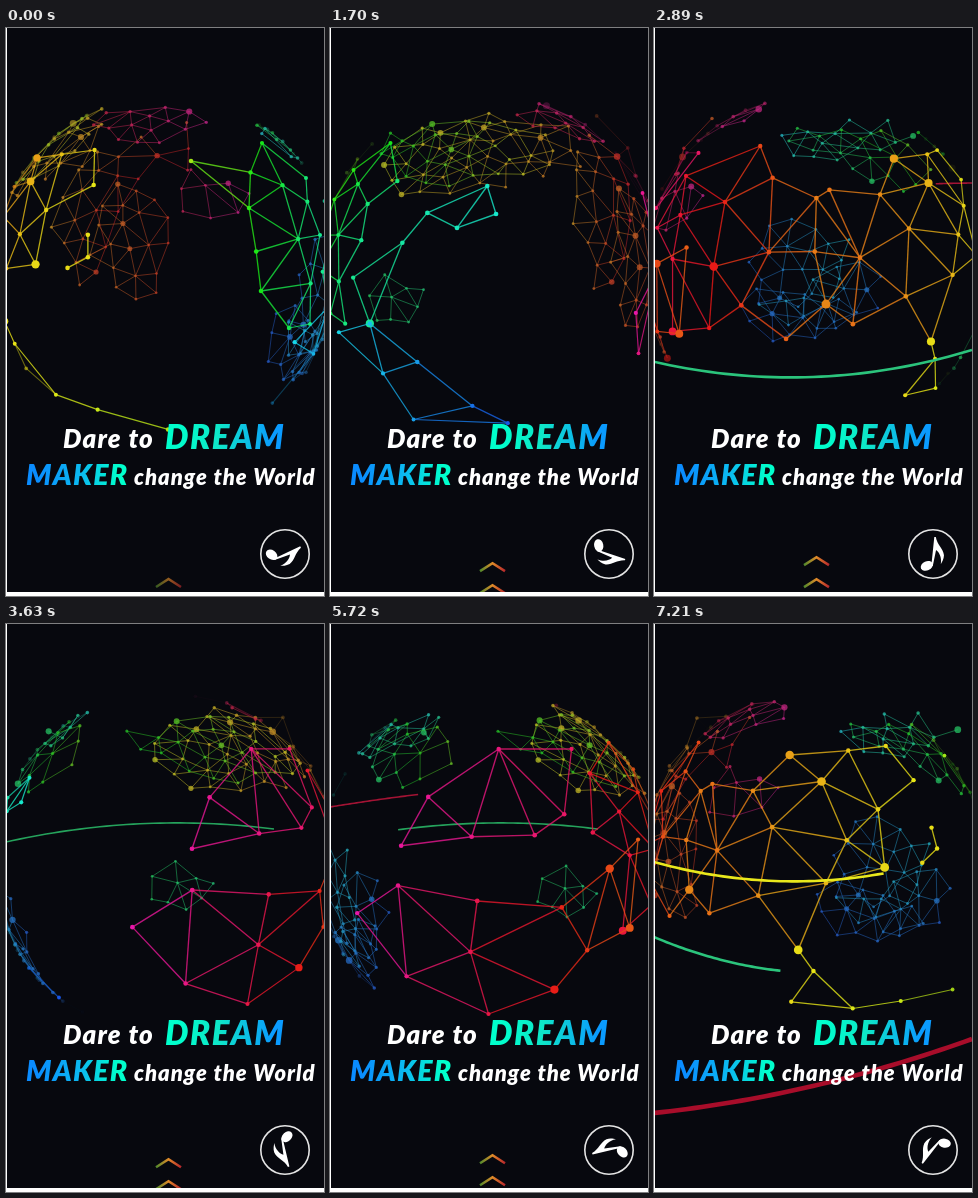
An HTML page with a canvas for the animation above (8 s loop, 318 px wide and 568 px high).

```html
<!DOCTYPE html>
<html lang="en">
<head>
<meta charset="utf-8">
<title>Dream globe</title>
<style>
  html, body { margin: 0; width: 100%; height: 100%; overflow: hidden; background: #fff; }
  canvas, svg { position: absolute; left: 0; top: 0; width: 318px; height: 568px; }
  text { font-family: Lato, "Open Sans", sans-serif; font-weight: 900; font-style: italic; letter-spacing: .045em; }
</style>
</head>
<body>
<canvas id="stage" width="318" height="568"></canvas>
<svg viewBox="0 0 318 568">
  <defs>
    <linearGradient id="dream"><stop offset=".1" stop-color="#0fc"/><stop offset=".45" stop-color="#0ee6c8"/><stop offset=".9" stop-color="#0a9bff"/></linearGradient>
    <linearGradient id="maker"><stop offset=".1" stop-color="#0a8cff"/><stop offset=".55" stop-color="#0bbcf0"/><stop offset=".9" stop-color="#0fc"/></linearGradient>
  </defs>
  <text x="57" y="420" font-size="26" fill="#fff">Dare to</text>
  <text x="159" y="421" font-size="33" fill="url(#dream)">DREAM</text>
  <text x="20" y="457" font-size="28.5" fill="url(#maker)">MAKER</text>
  <text x="128" y="457" font-size="22" fill="#fff">change the World</text>
  <g transform="translate(279 526)">
    <circle r="24.2" fill="#07080e" stroke="#e4e4e4" stroke-width="1.6"/>
    <g id="note" fill="#fff">
      <ellipse cx="-6" cy="12" rx="6.3" ry="4.6" transform="rotate(-25 -6 12)"/>
      <path d="M-1.500 12L1-17H2.500C4-9 10-6 11 1C11 5 9 8 8 10C9 3 6-2 3-4L0 12Z"/>
    </g>
  </g>
</svg>
<script>
const LOOP = 8000, TURN = 2280, STEP = 148.8;
const CX = 160, CY = 240, RADIUS = 165, CAMERA = 3.5, TILT = 0.2;
const NEAR = 1, FAR = -1;
const ctx = document.getElementById('stage').getContext('2d');
const note = document.getElementById('note');
const clamp = (v, lo = 0, hi = 1) => Math.min(hi, Math.max(lo, v));

let seed = 11;
const random = () => (seed = seed * 16807 % 2147483647) / 2147483647;

const spinAt = t => t / TURN * 2 * Math.PI;

function rotate(x, y, angle) {
  const c = Math.cos(angle), s = Math.sin(angle);
  return [x * c + y * s, y * c - x * s];
}

// Screen point to globe point, on the near or far side
function toGlobe(px, py, t, side) {
  const u = (px - CX) / RADIUS, v = (py - CY) / RADIUS, dd = CAMERA * CAMERA;
  const q = u * u + v * v + dd;
  const s = (dd - side * Math.sqrt(Math.max(0, dd * dd - q * (dd - 1)))) / q;
  const [y, z] = rotate(v * s, CAMERA - s * CAMERA, -TILT);
  const [x, depth] = rotate(u * s, z, -spinAt(t));
  return [x, y, depth];
}

function toScreen([gx, gy, gz], t) {
  const [x, depth] = rotate(gx, gz, spinAt(t));
  const [y, z] = rotate(gy, depth, TILT);
  const k = CAMERA / (CAMERA - z);
  return { x: CX + RADIUS * x * k, y: CY + RADIUS * y * k, z, k };
}

const gap2 = (a, b) => a.reduce((sum, v, i) => sum + (v - b[i]) ** 2, 0);

function insidePolygon(corners, x, y) {
  return corners.reduce((inside, [x1, y1], i) => {
    const [x2, y2] = corners[(i + 1) % corners.length];
    return (y1 > y) !== (y2 > y) && x < x1 + (x2 - x1) * (y - y1) / (y2 - y1) ? !inside : inside;
  }, false);
}

// Scatter nodes evenly over an area, keeping them `space` apart on the globe
function scatter(net, t, [x0, y0, x1, y1], hue, inside, corners = []) {
  const add = (x, y, always) => {
    const at = toGlobe(x, y, t, net.side);
    if (!always && net.nodes.some(n => gap2(n.at, at) < net.space ** 2)) return;
    net.nodes.push({ at, hue: hue[0] + (hue[1] - hue[0]) * (x - x0) / (x1 - x0), hub: random() < net.hubs });
  };
  corners.forEach(([x, y]) => add(x, y, true));
  for (let i = 0; i < 700; i++) {
    const x = x0 + random() * (x1 - x0), y = y0 + random() * (y1 - y0);
    if (inside(x, y)) add(x, y);
  }
}

// Join two nodes when no third node lies between them
function join(net, reach) {
  net.nodes.forEach((a, i) => net.nodes.forEach((b, j) => {
    const d = gap2(a.at, b.at);
    if (j > i && d < reach * reach &&
      net.nodes.every(c => c === a || c === b || gap2(a.at, c.at) + gap2(b.at, c.at) > d * 0.9)) net.edges.push([i, j]);
  }));
  return net;
}

// Land on the near side, outlined as seen at time t; parts share one mesh
function land(space, ...parts) {
  const net = { side: NEAR, space, hubs: 0.17, nodes: [], edges: [] };
  for (const [t, hue, outline] of parts) {
    const corners = outline.split(' ').map(p => p.split(',').map(Number));
    const xs = corners.map(c => c[0]), ys = corners.map(c => c[1]);
    const box = [Math.min(...xs), Math.min(...ys), Math.max(...xs), Math.max(...ys)];
    scatter(net, t, box, hue, (x, y) => insidePolygon(corners, x, y), corners);
  }
  return join(net, Math.max(0.42, space * 2.2));
}

// Oval cloud of nodes on the far side
function cloud(t, hue, cx, cy, rx, ry, space = 0.14) {
  const net = { side: FAR, space, hubs: 0.05, nodes: [], edges: [] };
  scatter(net, t, [cx - rx, cy - ry, cx + rx, cy + ry], hue,
    (x, y) => ((x - cx) / rx) ** 2 + ((y - cy) / ry) ** 2 < 1);
  return join(net, space * 2);
}

const clouds = [
  cloud(4830, [220, 185], 252, 245, 52, 50),
  cloud(4830, [185, 140], 262, 110, 55, 24),
  cloud(3630, [140, 152], 170, 263, 38, 26, 0.12),
  cloud(3630, [64, 30], 228, 128, 84, 46),
  cloud(5720, [155, 90], 78, 130, 46, 36),
  cloud(5720, [190, 222], 32, 290, 28, 54),
  cloud(1700, [130, 42], 135, 125, 95, 34),
  cloud(1700, [42, -15], 275, 180, 36, 95, 0.16),
  cloud(0, [32, 5], 125, 215, 42, 65),
  cloud(0, [345, 318], 205, 165, 42, 28, 0.16),
  cloud(0, [350, 320], 145, 95, 60, 20),
  cloud(0, [222, 205], 285, 315, 28, 38)
];
const lands = [
  land(0.2,
    [7210, [26, 60], '140,131 235,122 263,156 236,243 178,259 150,326 110,272 60,290 62,160'],
    [2890, [-15, 32], '108,118 165,170 175,276 135,311 20,304 4,200 33,148']),
  land(0.3, [4830, [56, 58], '241,229 236,207 221,243']),
  land(0.3, [7210, [56, 75], '150,326 165,347 142,378 203,384 250,376 300,364']),
  land(0.25, [5720, [322, 338], '75,222 102,173 172,125 244,125 238,190 209,211']),
  land(0.25, [5720, [318, 380], '72,262 30,290 80,353 145,328 162,390 228,365 302,303 310,215 236,283 152,277']),
  land(0.17, [0, [80, 155], '185,133 256,115 300,150 314,207 304,296 283,300 255,263 243,180']),
  land(0.3, [1700, [155, 172], '42,296 25,250 75,215 130,200 169,186 160,158 100,185']),
  land(0.25, [1700, [185, 222], '42,296 10,305 55,346 85,392 180,395 145,378'])
];

function drawNet(net, t) {
  const near = net.side === NEAR;
  const dots = net.nodes.map(n => toScreen(n.at, t));
  const shown = dots.map(d => clamp(net.side * (d.z - 1 / CAMERA) * 4 + 0.6) * (near ? 1 : 0.75));
  const tone = hue => `hsl(${hue} ${near ? 82 : 68}% ${near ? 50 : 45}%)`;
  for (const [i, j] of net.edges) {
    const a = dots[i], b = dots[j];
    ctx.globalAlpha = Math.min(shown[i], shown[j]) * 0.8;
    ctx.strokeStyle = tone((net.nodes[i].hue + net.nodes[j].hue) / 2);
    ctx.lineWidth = near ? (a.k + b.k) / 2 : 0.85;
    ctx.beginPath();
    ctx.moveTo(a.x, a.y);
    ctx.lineTo(b.x, b.y);
    ctx.stroke();
  }
  dots.forEach((d, i) => {
    ctx.globalAlpha = shown[i];
    ctx.fillStyle = tone(net.nodes[i].hue);
    ctx.beginPath();
    ctx.arc(d.x, d.y, (net.nodes[i].hub ? 3.2 : 1.7) * d.k, 0, 7);
    ctx.fill();
  });
  ctx.globalAlpha = 1;
}

// Parabola through heights at the left, middle and right, drawn from tail to head
function drawTrail([y0, y1, y2], from, to, color, width) {
  from = clamp(from, 0, 318);
  to = clamp(to, 0, 318);
  if (to <= from) return;
  const bow = 2 * y1 - (y0 + y2) / 2;
  ctx.beginPath();
  for (let i = 0; i <= 40; i++) {
    const x = from + (to - from) * i / 40, u = x / 318;
    ctx.lineTo(x, (1 - u) ** 2 * y0 + 2 * u * (1 - u) * bow + u * u * y2);
  }
  ctx.strokeStyle = color;
  ctx.lineWidth = width;
  ctx.stroke();
}

function drawBackTrails(a) {
  if (a < 92) return;
  drawTrail([183, 163, 155], 280 - 4 * (a - 96), 85 - 3 * (a - 183), '#a31334', 1.6);
  drawTrail([218, 199, 213], 65 - 3 * (a - 183), 268 - 8 * Math.max(0, a - 215), '#25a35c', 1.6);
}

function drawFrontTrails(a) {
  const green = 133 + 6 * (a - 58), yellow = 240 + 9.5 * (a - 58);
  const sag = clamp((a - 58) / 38);
  drawTrail([313 + 21 * sag, 349, 322], green - 420, green, '#2bc47c', 2.6);
  drawTrail([238, 257, 226], (a - 60) * 10, yellow, '#e9e81c', 2.6);
  drawTrail([489, 462, 415], (a - 62) * 20, (a - 20) * 20, '#a80d2a', 4.6);
}

function drawChevron(y, alpha) {
  const fade = ctx.createLinearGradient(150, 0, 175, 0);
  ['#4f8a2c', '#e08a28', '#b8262c'].forEach((c, i) => fade.addColorStop(i / 2, c));
  ctx.globalAlpha = clamp(alpha);
  ctx.strokeStyle = fade;
  ctx.lineWidth = 2.5;
  ctx.beginPath();
  ctx.moveTo(150, y + 9);
  ctx.lineTo(162.5, y + 1);
  ctx.lineTo(175, y + 9);
  ctx.stroke();
  ctx.globalAlpha = 1;
}

function drawChevrons(t) {
  const beat = t % 968;
  if (beat < 480) return drawChevron(550 - beat * 0.02, 0.65 * (1 - beat / 300));
  const y = 534 + (732 - beat) * 0.027, alpha = (beat - 480) / 200;
  drawChevron(y, alpha);
  drawChevron(y + 22, alpha);
}

function draw(t) {
  const angle = t / TURN * 360 % 360;
  ctx.fillStyle = '#fff';
  ctx.fillRect(0, 0, 318, 568);
  ctx.save();
  ctx.beginPath();
  ctx.rect(1, 0, 317, 564);
  ctx.clip();
  ctx.fillStyle = '#07080e';
  ctx.fillRect(0, 0, 318, 568);
  clouds.forEach(net => drawNet(net, t));
  drawBackTrails(angle);
  lands.forEach(net => drawNet(net, t));
  drawFrontTrails(angle);
  drawChevrons(t);
  ctx.restore();
  const turn = t < 1700 ? 60 + t * 0.238 : 465 + (t - 1700) * 0.216;
  note.setAttribute('transform', `rotate(${turn})`);
}

// The picture moves in even steps, rests briefly at first and holds at the end
const stepAt = t => t < 150 ? 0 : Math.min(7210, 58 + Math.floor((t - 58) / STEP) * STEP);

const start = performance.now();
let last = -1;
function tick() {
  const step = stepAt((performance.now() - start) % LOOP);
  if (step !== last) draw(last = step);
  requestAnimationFrame(tick);
}
tick();
</script>
</body>
</html>
```
